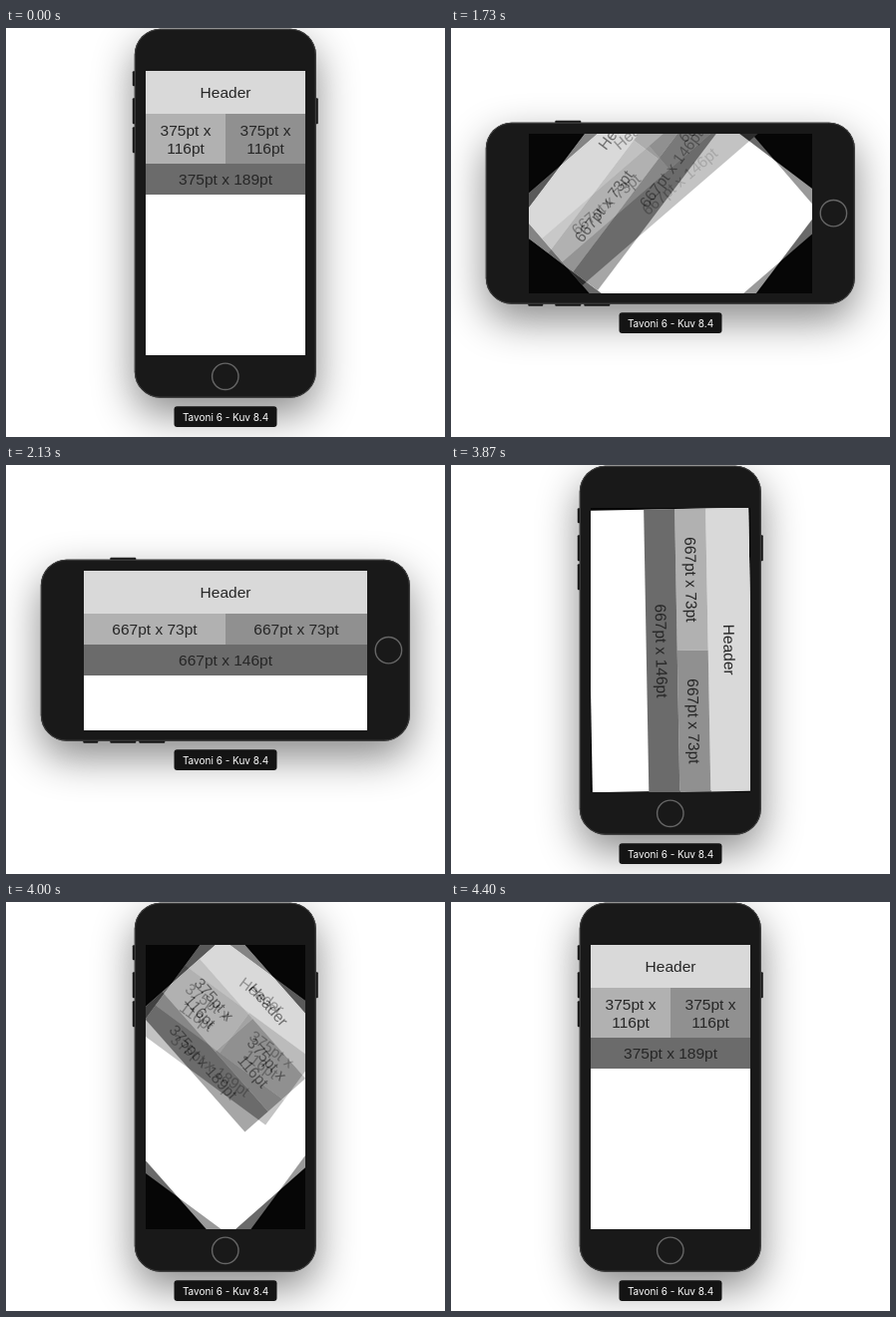
Recreate the animation shown at these times as an HTML page with a canvas. Size 440 by 410 pixels, loop 5.73 s.

```html
<!DOCTYPE html>
<html lang="en">
<head>
<meta charset="utf-8">
<title>Layout rotation</title>
<style>
  html, body { margin: 0; width: 100%; height: 100%; overflow: hidden; background: #fff; }
  canvas { display: block; }
</style>
</head>
<body>
<canvas id="stage" width="440" height="410"></canvas>
<script>
const LOOP = 5730, SPIN = 320, GHOST_DELAY = 27.5, GHOST_ALPHA = 0.4;
const portrait = {
  x: 140, y: 43, w: 160, h: 285, row: 50, pillY: 379, deviceAngle: 0,
  cell: ['375pt x', '116pt'], bar: ['375pt x 189pt']
};
const landscape = {
  x: 78, y: 106, w: 284, h: 160, row: 31, pillY: 285, deviceAngle: -Math.PI / 2,
  cell: ['667pt x 73pt'], bar: ['667pt x 146pt']
};
// "shown" is when the shell flips; "start" is when the content begins turning.
const turns = [
  { shown: 1600, start: 1588, from: portrait, to: landscape, angle: -Math.PI / 2 },
  { shown: 3870, start: 3848, from: landscape, to: portrait, angle: Math.PI / 2 }
];

const stage = document.getElementById('stage');
const ctx = stage.getContext('2d');
const ghost = document.createElement('canvas');
ghost.width = 440;
ghost.height = 410;
const ghostCtx = ghost.getContext('2d');

const mix = (a, b, p) => a + (b - a) * p;
const ease = t => (1 - Math.cos(Math.PI * Math.min(1, Math.max(0, t)))) / 2;

function snap(t) {
  const at = k => Math.round(k * 100 / 15) * 10;
  const k = Math.round(t * 0.015);
  return at(k) > t ? at(k - 1) : at(k);
}

function roundRect(c, x, y, w, h, r) {
  c.beginPath();
  c.roundRect(x, y, w, h, r);
}

function block(c, x, y, w, h, color, lines) {
  c.fillStyle = color;
  c.fillRect(x, y, w, h);
  c.fillStyle = '#262626';
  lines.forEach((line, i) =>
    c.fillText(line, x + w / 2, y + h / 2 + 5.8 + (i - (lines.length - 1) / 2) * 18.6));
}

function drawLayout(c, { w, row, cell, bar }) {
  c.font = '15.5px "Liberation Sans", Arial, sans-serif';
  c.textAlign = 'center';
  block(c, 0, 0, w, 43, '#d9d9d9', ['Header']);
  block(c, 0, 43, w / 2, row, '#b1b1b1', cell);
  block(c, w / 2, 43, w / 2, row, '#909090', cell);
  block(c, 0, 43 + row, w, 31, '#6b6b6b', bar);
}

// The root view turns and resizes; its children are already laid out from its top left.
function drawScreen(c, screen, layout, w, h, angle) {
  c.save();
  c.beginPath();
  c.rect(screen.x, screen.y, screen.w, screen.h);
  c.clip();
  c.fillStyle = '#060606';
  c.fillRect(screen.x, screen.y, screen.w, screen.h);
  c.translate(screen.x + screen.w / 2, screen.y + screen.h / 2);
  c.rotate(angle);
  c.translate(-w / 2, -h / 2);
  c.fillStyle = '#fff';
  c.fillRect(0, 0, w, h);
  drawLayout(c, layout);
  c.restore();
}

function drawTurn(c, { start, from, to, angle }, time, layout) {
  const p = ease((time - start) / SPIN);
  drawScreen(c, to, layout, mix(from.w, to.w, p), mix(from.h, to.h, p), angle * (1 - p));
}

function drawDevice({ deviceAngle, pillY }) {
  ctx.save();
  ctx.translate(219.8, 185.7);
  ctx.rotate(deviceAngle);

  ctx.fillStyle = '#202020';
  for (const [x, y, h] of [[-93, -142.5, 15], [-93, -115.5, 26], [-93, -86.5, 26], [89, -115.5, 26]]) {
    roundRect(ctx, x, y, 4, h, 1);
    ctx.fill();
  }

  ctx.save();
  ctx.shadowColor = 'rgba(0,0,0,.47)';
  ctx.shadowBlur = 42;
  ctx.shadowOffsetY = 16;
  ctx.fillStyle = '#191919';
  roundRect(ctx, -91, -185, 182, 370, 26);
  ctx.fill();
  ctx.restore();

  ctx.strokeStyle = '#444';
  ctx.lineWidth = 1;
  roundRect(ctx, -90.5, -184.5, 181, 369, 25.5);
  ctx.stroke();

  ctx.strokeStyle = '#666';
  ctx.lineWidth = 1.4;
  ctx.beginPath();
  ctx.arc(0, 163.6, 13.2, 0, 7);
  ctx.stroke();
  ctx.restore();

  ctx.fillStyle = '#141414';
  roundRect(ctx, 168.5, pillY + 0.3, 103, 20.7, 3);
  ctx.fill();
  ctx.fillStyle = '#fff';
  ctx.font = '10px Inter, sans-serif';
  ctx.textAlign = 'center';
  ctx.fillText('Tavoni 6 - Kuv 8.4', 220, pillY + 15);
}

function render(time) {
  const now = snap(time);
  const turn = turns.findLast(t => now >= t.shown);
  const view = turn ? turn.to : portrait;

  ctx.fillStyle = '#fff';
  ctx.fillRect(0, 0, 440, 410);
  drawDevice(view);

  if (!turn || now >= turn.start + SPIN) {
    drawScreen(ctx, view, view, view.w, view.h, 0);
  } else if (now === turn.shown) {
    drawTurn(ctx, turn, now, turn.from);
  } else {
    drawTurn(ctx, turn, now, view);
    ghostCtx.clearRect(0, 0, 440, 410);
    drawTurn(ghostCtx, turn, now + GHOST_DELAY, view);
    ctx.globalAlpha = GHOST_ALPHA;
    ctx.drawImage(ghost, 0, 0);
    ctx.globalAlpha = 1;
  }
}

const began = performance.now();
function tick() {
  render((performance.now() - began) % LOOP);
  requestAnimationFrame(tick);
}
tick();
</script>
</body>
</html>
```
